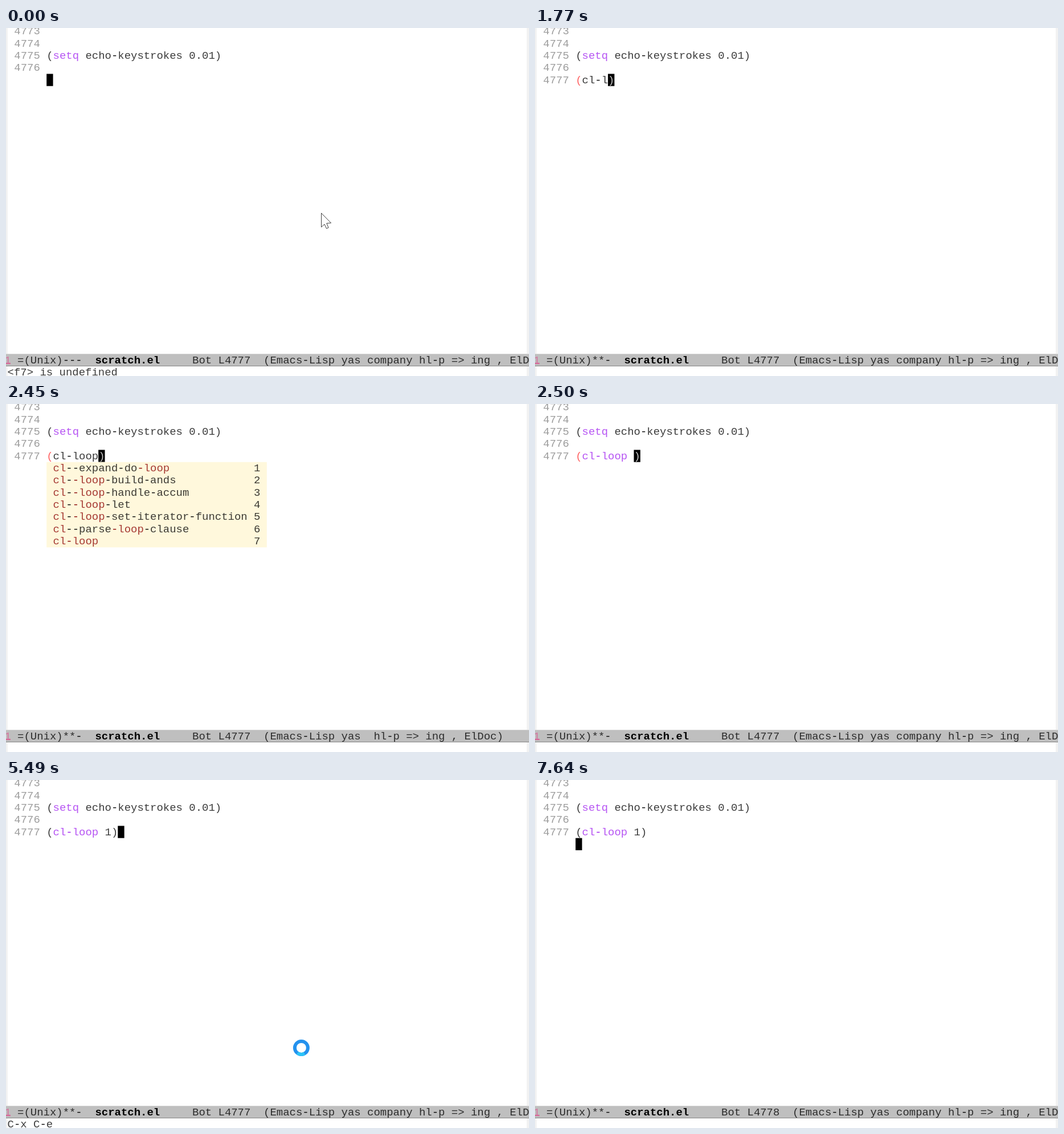
Write an HTML page with a canvas that moves like this. It is 918 by 610 pixels and loops after 8000 ms.

```html
<!DOCTYPE html>
<html lang="en">
<head>
<meta charset="utf-8">
<title>Editor session</title>
<style>
html, body { margin: 0; width: 100%; height: 100%; overflow: hidden; background: #fff; }
canvas { display: block; width: 918px; height: 610px; }
</style>
</head>
<body>
<canvas id="stage" width="918" height="610"></canvas>
<script>
const ctx = document.getElementById('stage').getContext('2d');
const W = 918, H = 610, LOOP = 8000;
const CW = 11.37, RH = 21.36, ASC = 16.2;
const LEFT = 71.2, TOP = 80.4;
const FONT = '18.95px "Courier New", "Liberation Mono", monospace';
const INK = 0.77; // softens the regular weight to a thin typewriter face
const BLACK = '#000', RED = '#ff3030', PURPLE = '#a020f0', MATCH = '#8b0000';

const EXPAND = 'cl--expand-do-loop', LOAD = 'cl--generic-load-hist-format';
const LOOPS = ['cl--loop-build-ands', 'cl--loop-handle-accum', 'cl--loop-let',
  'cl--loop-set-iterator-function', 'cl--parse-loop-clause'];
const POPUPS = {
  l: [EXPAND, 'cl--generic-lambda', LOAD, 'cl--labels-convert', 'cl--labels-magic', ...LOOPS],
  lo: [EXPAND, LOAD, ...LOOPS, 'cl-load-time-value', 'cl-locally', 'cl-loop'],
  loo: [EXPAND, ...LOOPS, 'cl-loop']
};
POPUPS.loop = POPUPS.loo;

// Each step changes only the named fields of the editor state.
const START = { code: '', col: 0, row: 0, echo: '<f7> is undefined', flags: '---', line: 4777,
  open: BLACK, close: BLACK, popup: '', arrow: [553, 324], keyword: false };
const STEPS = [
  [970, { code: '()', col: 1, echo: '', flags: '**-' }],
  [1040, { open: RED, arrow: null }],
  [1110, { code: '(c)', col: 2 }],
  [1240, { code: '(cl)', col: 3 }],
  [1510, { code: '(cl-)', col: 4 }],
  [1770, { code: '(cl-l)', col: 5 }],
  [1840, { popup: 'l' }],
  [2040, { code: '(cl-lo)', col: 6, popup: 'lo' }],
  [2170, { code: '(cl-loo)', col: 7, popup: 'loo' }],
  [2450, { code: '(cl-loop)', col: 8, popup: 'loop' }],
  [2500, { code: '(cl-loop )', col: 9, popup: '', keyword: true }],
  [2720, { code: '(cl-loop 1)', col: 10 }],
  [3180, { col: 11, close: RED }],
  [4170, { close: '#8b3a3a' }],
  [4240, { open: BLACK, close: BLACK }],
  [4300, { echo: 'C-x-' }],
  [4640, { echo: 'C-x C-e' }],
  [6660, { echo: 'Quit', arrow: [363, 201] }],
  [7640, { echo: '', row: 1, col: 0, line: 4778, arrow: null }]
];

// Busy ring path: time, x, y
const PATH = [[5420, 537, 500], [5580, 495, 431], [5760, 445, 300], [5960, 402, 196],
  [6100, 384, 225], [6170, 375, 217], [6380, 363, 201], [6660, 363, 201]];

function stateAt(t) {
  const s = { ...START };
  for (const [at, change] of STEPS) if (t >= at) Object.assign(s, change);
  return s;
}

function rect(x, y, w, h, color) {
  ctx.fillStyle = color;
  ctx.fillRect(x, y, w, h);
}

// Monospace grid text; color is a value or a function of the column.
function text(str, x, base, color = BLACK, bold = false) {
  ctx.font = (bold ? 'bold ' : '') + FONT;
  for (let i = 0; i < str.length; i++) {
    if (str[i] === ' ') continue;
    ctx.globalAlpha = bold || str[i] === '-' ? 1 : INK;
    ctx.fillStyle = typeof color === 'function' ? color(i) : color;
    ctx.fillText(str[i], x + i * CW, base);
  }
  ctx.globalAlpha = 1;
}

const rowTop = r => TOP + r * RH;
const base = r => rowTop(r) + ASC;
const colX = c => LEFT + c * CW;

function drawBuffer(s) {
  for (let r = -4; r <= (s.code ? 0 : -1); r++)
    text(String(4777 + r), colX(-5), base(r), '#7f7f7f');
  text('(setq echo-keystrokes 0.01)', LEFT, base(-2), i => i > 0 && i < 5 ? PURPLE : BLACK);
  const last = s.code.length - 1;
  text(s.code, LEFT, base(0), i =>
    i === 0 ? s.open : i === last ? s.close : s.keyword && i < 8 ? PURPLE : BLACK);

  rect(colX(s.col), rowTop(s.row), CW, RH, BLACK);
  if (s.row === 0 && s.code[s.col]) text(s.code[s.col], colX(s.col), base(0), '#fff');
}

function drawPopup(typed) {
  const list = POPUPS[typed];
  const tail = '-' + typed;
  const top = rowTop(1), width = 34 * CW, height = list.length * RH;
  rect(LEFT, top, width, height, '#fff8dc');
  list.forEach((name, i) => {
    const at = name.indexOf(tail, 2);
    text(name, colX(1), base(i + 1), c =>
      c < 2 || (c >= at && c < at + tail.length) ? MATCH : BLACK);
    text(String((i + 1) % 10), colX(32), base(i + 1));
  });
  if (typed === 'l') {
    rect(colX(34), top, CW, height, '#f5deb3');
    rect(colX(34), top, CW, height / 2, MATCH);
  }
}

function drawModeLine(s) {
  const x0 = -2.7, y = 587.8, at = c => x0 + c * CW;
  rect(0, 571, W, 22, '#bfbfbf');
  rect(0, 571, W, 1, '#d2d2d2');
  rect(0, 592, W, 1, '#858585');
  text('1', x0, y, '#db5b94');
  rect(0, 588, 8, 1, '#db5b94');
  text('=(Unix)' + s.flags, at(2), y);
  text('scratch.el', at(14), y, BLACK, true);
  text('Bot L' + s.line, at(29), y);
  text(`(Emacs-Lisp yas ${s.popup ? '' : 'company'} hl-p => ing , ElDoc)`, at(40), y);
}

function drawArrow([x, y]) {
  const pts = [[0, 0], [0, 24.5], [5.5, 19.5], [9, 27], [12.5, 25.5], [9.3, 17.8], [17, 17.3]];
  ctx.beginPath();
  pts.forEach(([px, py]) => ctx.lineTo(x + 0.5 + px, y + 0.5 + py));
  ctx.closePath();
  ctx.fillStyle = '#fff';
  ctx.fill();
  ctx.lineWidth = 0.75;
  ctx.strokeStyle = BLACK;
  ctx.stroke();
}

function drawRing(t) {
  if (t < PATH[0][0] || t >= 6660) return;
  const k = PATH.findIndex(p => p[0] > t);
  const [t0, x0, y0] = PATH[k - 1], [t1, x1, y1] = PATH[k];
  const f = (t - t0) / (t1 - t0);
  const x = x0 + (x1 - x0) * f, y = y0 + (y1 - y0) * f;
  const arc = (a, b, color) => {
    ctx.beginPath();
    ctx.arc(x, y, 11.5, a, b);
    ctx.strokeStyle = color;
    ctx.stroke();
  };
  ctx.lineWidth = 6;
  arc(0, Math.PI * 2, '#2492ee');
  const a = -1.4 + (t - 6100) / 1000 * Math.PI * 2;
  arc(a, a + 1.15, '#2cc4f8');
}

function draw(t) {
  const s = stateAt(t);
  rect(0, 0, W, H, '#fff');
  rect(0, 0, 3, H, '#f2f2f2');
  rect(914, 0, 4, H, '#f2f2f2');
  drawBuffer(s);
  if (s.popup) drawPopup(s.popup);
  drawModeLine(s);
  text(s.echo, 2.6, 609.3);
  if (s.arrow) drawArrow(s.arrow);
  drawRing(t);
}

const begin = performance.now();
function frame() {
  draw((performance.now() - begin) % LOOP);
  requestAnimationFrame(frame);
}
frame();
</script>
</body>
</html>
```
